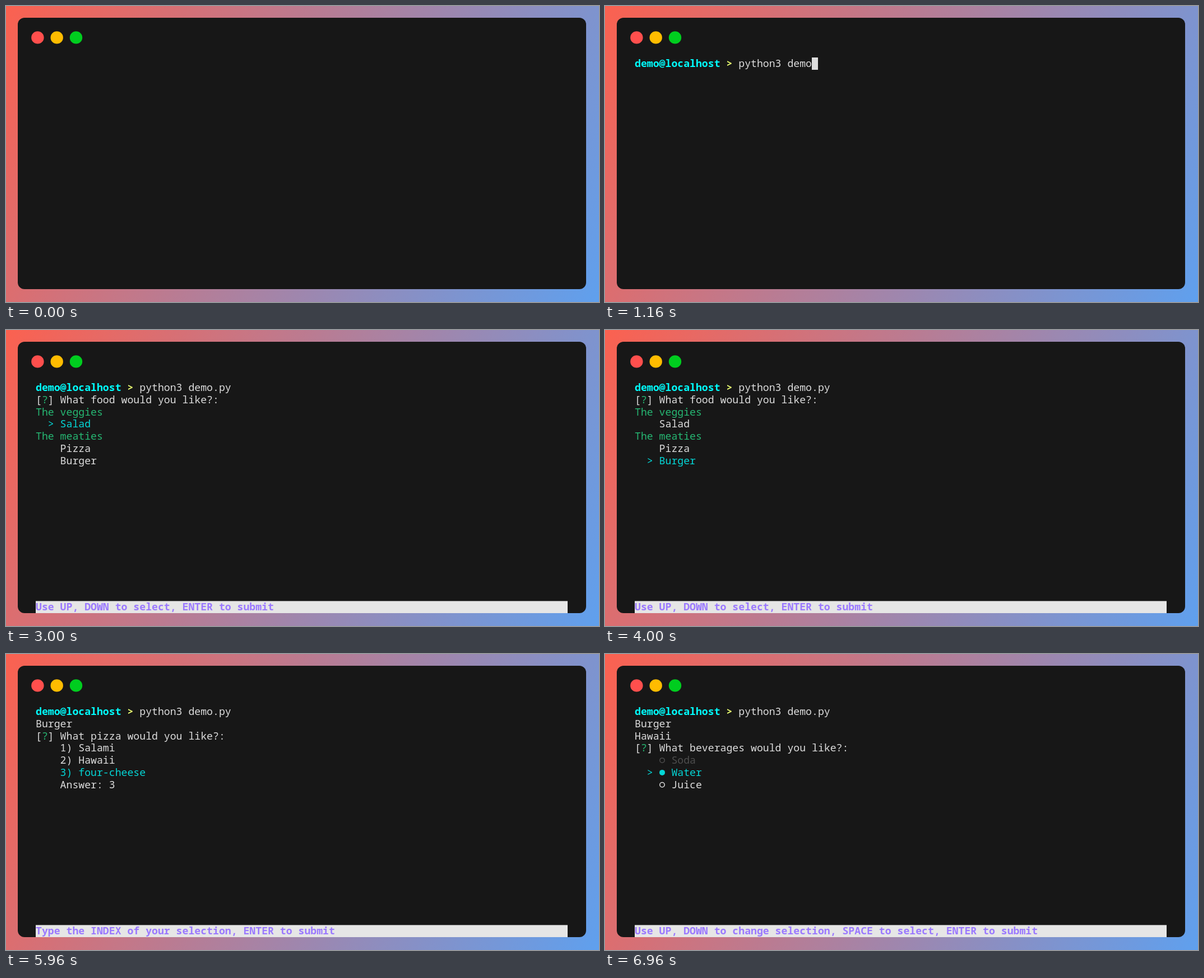
Recreate the animation shown at these times as an HTML page with a canvas. Size 1058 px wide and 529 px high, loop 8000 ms.

```html
<!DOCTYPE html>
<html lang="en">
<head>
<meta charset="utf-8">
<title>Terminal prompts</title>
<style>
html, body { margin: 0; height: 100%; overflow: hidden; }
canvas { display: block; }
</style>
</head>
<body>
<canvas id="stage" width="1058" height="529"></canvas>
<script>
const ctx = document.getElementById('stage').getContext('2d');
const LOOP = 8000, TICK = 40;
const LEFT = 53, TOP = 92, CELL = 10.896, LINE = 21.8;
const FG = '#dddddd', GREEN = '#26b873', CYAN = '#04d7d7', GRAY = '#4d4d4d';
const COMMAND = 'python3 demo.py';

const cellX = col => LEFT + col * CELL;
const cellY = row => TOP + row * LINE;

function write(row, col, text, color = FG, weight = 400) {
  ctx.font = `${weight} 18.16px "Noto Sans Mono", monospace`;
  ctx.fillStyle = color;
  [...text].forEach((char, i) => ctx.fillText(char, cellX(col + i), cellY(row) + 17));
}

function disc(x, y, radius, color) {
  ctx.fillStyle = color;
  ctx.beginPath();
  ctx.arc(x, y, radius, 0, Math.PI * 2);
  ctx.fill();
}

function radio(row, color, checked) {
  const x = cellX(4.5), y = cellY(row + 0.5);
  if (checked) return disc(x, y, 5, color);
  ctx.strokeStyle = color;
  ctx.lineWidth = 1.5;
  ctx.beginPath();
  ctx.arc(x, y, 4.2, 0, Math.PI * 2);
  ctx.stroke();
}

function cursor(row, col) {
  ctx.fillStyle = FG;
  ctx.fillRect(Math.round(cellX(col)), Math.round(cellY(row)), 11, 22);
}

function question(row, text) {
  write(row, 0, '[ ]');
  write(row, 1, '?', GREEN);
  write(row, 4, text);
}

function toolbar(text) {
  ctx.fillStyle = '#e6e6e6';
  ctx.fillRect(LEFT, 484.4, 949, 21.6);
  write(18, 0, text, '#9b79ff', 700);
}

function drawWindow() {
  const fade = ctx.createLinearGradient(0, 0, 1058, 529);
  fade.addColorStop(0, '#fb6150');
  fade.addColorStop(1, '#5fa0ee');
  ctx.fillStyle = fade;
  ctx.fillRect(0, 0, 1058, 529);
  ctx.fillStyle = '#171717';
  ctx.beginPath();
  ctx.roundRect(21, 21, 1014, 485, 12);
  ctx.fill();
  ['#ff4f4d', '#ffbc00', '#00cd1f'].forEach((color, i) => disc(56.4 + i * 34.3, 56.4, 11.2, color));
}

function drawCommand(t) {
  const typed = t <= 40 ? 0 : Math.floor((t - 40) / 100) + 1;
  write(0, 0, 'demo@localhost', '#00fefe', 700);
  write(0, 15, '>', '#ebff71', 700);
  write(0, 17, COMMAND.slice(0, typed));
  if (t < 1560) cursor(0, 17 + typed);
  else if (t < 1920) cursor(1, 0);
}

function drawFood(t) {
  const selected = t < 3000 ? 5 : t < 3520 ? 3 : t < 4000 ? 5 : 6;
  question(1, 'What food would you like?:');
  write(2, 0, 'The veggies', GREEN);
  write(4, 0, 'The meaties', GREEN);
  [[3, 'Salad'], [5, 'Pizza'], [6, 'Burger']].forEach(([row, name]) =>
    write(row, 4, name, row === selected ? CYAN : FG));
  write(selected, 2, '>', CYAN);
  toolbar('Use UP, DOWN to select, ENTER to submit');
}

function drawPizza(t) {
  const answer = t < 5960 ? 1 : t < 6440 ? 3 : 2;
  question(2, 'What pizza would you like?:');
  ['Salami', 'Hawaii', 'four-cheese'].forEach((name, i) =>
    write(3 + i, 4, `${i + 1}) ${name}`, i + 1 === answer ? CYAN : FG));
  write(6, 4, `Answer: ${answer}`);
  toolbar('Type the INDEX of your selection, ENTER to submit');
}

function drawDrinks() {
  question(3, 'What beverages would you like?:');
  [['Soda', GRAY], ['Water', CYAN], ['Juice', FG]].forEach(([name, color], i) => {
    radio(4 + i, color, i === 1);
    write(4 + i, 6, name, color);
  });
  write(5, 2, '>', CYAN);
  toolbar('Use UP, DOWN to change selection, SPACE to select, ENTER to submit');
}

function draw(t) {
  drawWindow();
  if (t < 40) return;
  drawCommand(t);
  if (t >= 4480) write(1, 0, 'Burger');
  if (t >= 6920) write(2, 0, 'Hawaii');
  if (t >= 6960) drawDrinks();
  else if (t >= 6920) cursor(3, 0);
  else if (t >= 4520) drawPizza(t);
  else if (t >= 4480) cursor(2, 0);
  else if (t >= 1920) drawFood(t);
}

function tick() {
  const t = performance.now() % LOOP;
  draw(Math.floor(t / TICK) * TICK);
  requestAnimationFrame(tick);
}
tick();
</script>
</body>
</html>
```
